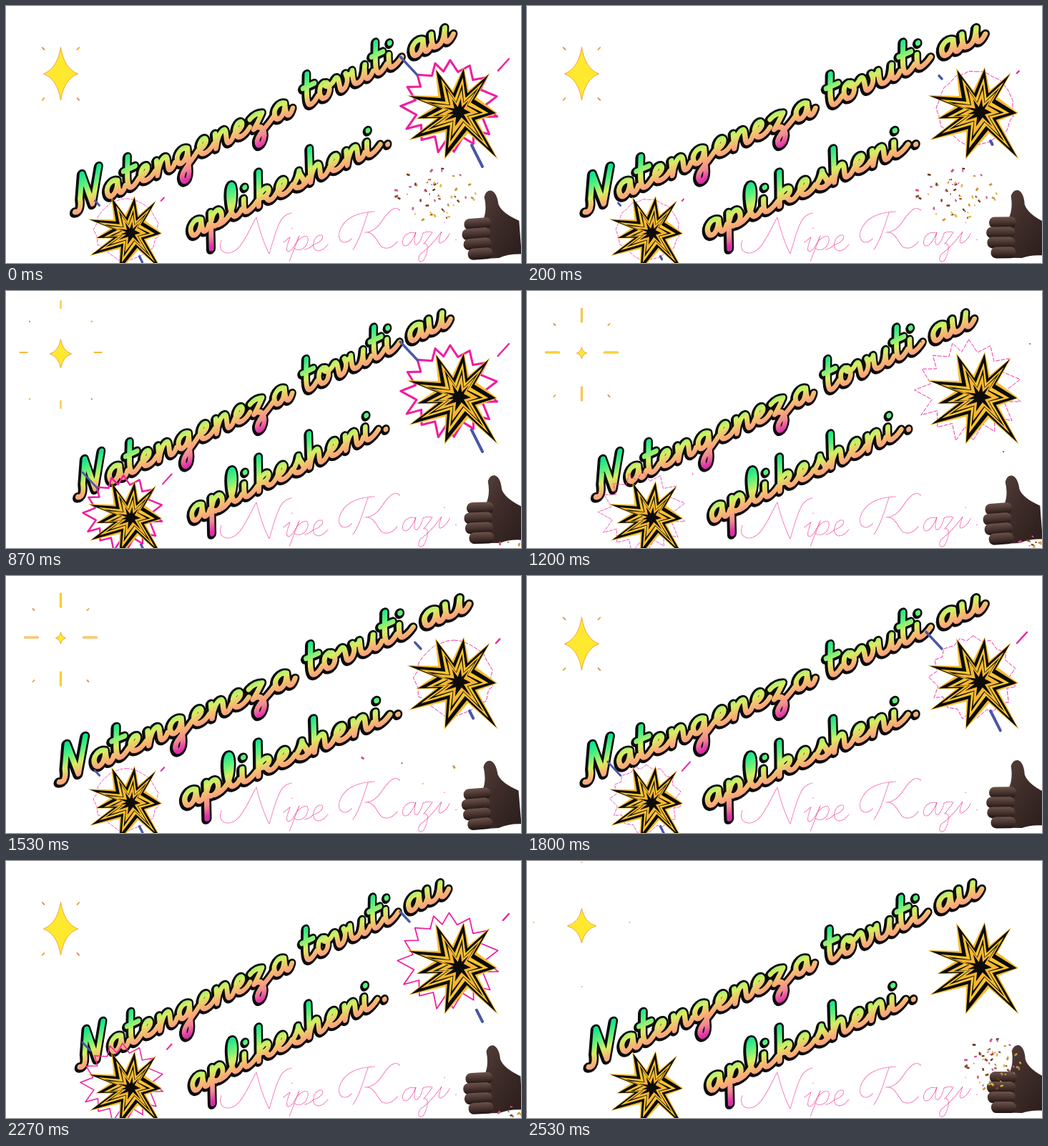
An HTML page that plays this animation: 720x360 px, repeating every 2590 ms.

```html
<!DOCTYPE html>
<html lang="sw">
<head>
<meta charset="utf-8">
<title>Natengeneza tovuti au aplikesheni.</title>
<style>
html, body { margin: 0; width: 100%; height: 100%; overflow: hidden; background: #fff; }
svg { display: block; width: 720px; height: 360px; }
path, line { stroke-linecap: round; stroke-linejoin: round; }
</style>
</head>
<body>
<svg viewBox="0 0 720 360" role="img" aria-label="Natengeneza tovuti au aplikesheni. Nipe Kazi.">
  <defs>
    <linearGradient id="ink" gradientUnits="userSpaceOnUse" x1="0" y1="-46" x2="0" y2="24">
      <stop offset="0" stop-color="#12e48c"/>
      <stop offset=".22" stop-color="#62f07c"/>
      <stop offset=".42" stop-color="#d6ef62"/>
      <stop offset=".6" stop-color="#f9b374"/>
      <stop offset=".8" stop-color="#f28a92"/>
      <stop offset="1" stop-color="#e02cac"/>
    </linearGradient>
    <linearGradient id="skin" x1="0" y1="0" x2="1" y2="1">
      <stop offset="0" stop-color="#5c4640"/>
      <stop offset=".5" stop-color="#3f2d2a"/>
      <stop offset="1" stop-color="#2a1d1b"/>
    </linearGradient>
    <linearGradient id="finger" x1="0" y1="0" x2="0" y2="1">
      <stop offset="0" stop-color="#6d534c"/>
      <stop offset=".6" stop-color="#412e2a"/>
      <stop offset="1" stop-color="#1d1311"/>
    </linearGradient>
  </defs>
  <g id="sparkle"></g>
  <g id="script" fill="none" stroke="#f0479f" stroke-width="1.1" stroke-dasharray=".6 1.7">
    <path d="M301 329C294 346 314 354 328 335C338 321 344 306 350 296C354 312 360 332 368 347C373 331 377 314 384 301Q389 292 399 290"/>
    <path d="M388 331Q394 326 397 324C394 333 390 343 395 344Q402 342 409 324M400 311v.5"/>
    <path d="M410 322L396 358M405 333C412 322 424 318 422 329C420 340 409 345 403 339M418 341Q424 340 430 334C440 332 446 323 441 321C433 320 427 332 431 340C436 346 444 342 450 334"/>
    <path d="M483 326C474 336 463 330 466 317C471 299 488 289 516 288M506 290C500 306 495 327 485 341M550 286C543 278 533 290 525 302C519 311 511 317 502 317C514 316 517 327 524 336C531 342 540 339 547 330"/>
    <path d="M572 318C562 314 552 325 555 334C560 341 569 328 573 317C570 329 570 336 575 334Q580 330 583 318Q590 315 596 317Q590 326 584 333C592 331 590 345 584 356C577 362 574 354 580 347Q594 337 609 316C606 325 603 333 608 332Q615 329 620 319M613 303v.5M629 327v2"/>
  </g>
  <g id="words"></g>
  <g id="bursts"></g>
  <g id="hand">
    <path fill="url(#skin)" d="M678 266Q681 257 688 258Q696 261 697 278Q701 291 724 303V350Q706 348 692 353L656 352L652 300L674 298Q681 285 678 266Z"/>
    <g id="fingers" fill="url(#finger)"></g>
  </g>
  <g id="confetti"></g>
</svg>
<script>
// All motion is counted in steps of 1/15 s
const LOOP = 2590, STEP = 200 / 3, STEPS = 39;
const $ = id => document.getElementById(id);
const clamp = v => Math.max(0, Math.min(1, v));
const wave = (i, period, peak) => Math.cos(2 * Math.PI * (i - peak) / period);

// Linear value from [position, value] pairs
function mix(t, keys) {
  if (t <= keys[0][0]) return keys[0][1];
  for (let i = 1; i < keys.length; i++) {
    const [a, va] = keys[i - 1], [b, vb] = keys[i];
    if (t <= b) return va + (vb - va) * (t - a) / (b - a);
  }
  return keys[keys.length - 1][1];
}

function seeded(seed) {
  return () => (seed = (seed * 16807) % 2147483647) / 2147483647;
}

// Cursive letters: [advance, path], baseline at 0
const glyphs = {
  N: [46, "M0-2C7 2 10-6 11-16L21-46L26-2L46-46"],
  a: [28, "M20-17C12-23 2-15 3-6C4 3 15 1 20-16C18-4 19 1 23 0Q26-1 29-6"],
  n: [29, "M5-19L2 0C6-11 13-20 18-19C23-17 15 0 21 0Q25 0 29-6"],
  e: [24, "M2-8C10-8 18-14 14-19C9-22 2-13 4-5C6 2 16 0 24-7"],
  t: [21, "M13-41C9-25 3-8 6-2C9 2 15-2 21-7M3-25L20-25"],
  g: [33, "M21-17C13-23 3-15 4-6C5 2 16 0 21-16L16 14C13 26 4 26 5 17C7 8 20 4 33-7"],
  z: [34, "M3-17Q12-22 21-18Q12-8 5-2C14-5 19 2 17 12C13 24 3 24 6 14C10 6 24 2 34-6"],
  o: [26, "M12-20C4-19 1-6 6-1C13 3 22-8 17-17C15-21 11-19 14-15Q19-11 26-16"],
  v: [25, "M2-18Q6-21 7-16C8-8 5 0 10 0C16-1 22-10 19-19Q21-14 25-16"],
  u: [32, "M4-19C3-10 0 0 8 0C15 0 20-9 23-19C20-9 18 0 24 0Q28-1 32-6"],
  i: [23, "M6-18C4-9 1 0 8 0Q15-1 23-7M11-32v.1"],
  p: [31, "M7-20L-3 26M6-10C11-20 20-23 21-13C21-2 10 3 5-3M14 0Q24 0 31-6"],
  l: [18, "M1-6C12-18 17-44 11-43C5-40 0-4 7-1Q13 0 18-6"],
  k: [28, "M11-43Q6-20 1 0M3-9C8-19 19-22 19-15C18-9 10-8 7-9Q13-9 15-3Q19 2 28-6"],
  s: [23, "M1-6Q10-13 13-21C12-13 20-6 15-1Q9 2 4-2M15-1Q20-2 23-7"],
  h: [30, "M11-43L2 0C6-12 14-21 18-18C21-15 14 0 20 0Q25 0 30-6"],
  ".": [8, "M10-3v.1"]
};

function word(text, x, base, wide) {
  let pen = 0, parts = "";
  for (const ch of text) {
    const [adv, d] = glyphs[ch];
    parts += `<path transform="translate(${pen} 0)" d="${d}"/>`;
    pen += adv;
  }
  const slope = -.427;
  const layer = (shift, color, width) =>
    `<g transform="matrix(${wide} ${slope * wide} .25 1 ${x - shift} ${base + slope * x + shift})" stroke="${color}" stroke-width="${width}">${parts}</g>`;
  return [layer(.8, "#0c0c0c", 13.5), layer(0, "url(#ink)", 7)];
}

const words = [
  word("Natengeneza", 75, 322.5, 1.03), word("tovuti", 423, 322.5, 1),
  word("au", 584, 322.5, 1.08), word("aplikesheni.", 249, 431, 1.03)
];
$("words").setAttribute("fill", "none");
$("words").innerHTML = words.map(w => w[0]).join("") + words.map(w => w[1]).join("");

$("fingers").innerHTML = [[647, 295, 38], [643, 309, 40], [644, 323, 39], [649, 337, 35]]
  .map(([x, y, w]) => `<rect x="${x}" y="${y}" width="${w}" height="16" rx="7.5"/>`).join("");

// Sparkle poses: star centre and radii, axis rays, diagonal ticks
const big = { cy: 95, rx: 24, ry: 37, dx: 23, dy: 34, tick: 4 };
const tiny = { cy: 87, rx: 7, ry: 8, ax: 32, ay: 46, len: 18, w: 3, dx: 37, dy: 49, tick: 3 };
const small = { cy: 88, rx: 15, ry: 20, ax: 47, ay: 65, len: 10, w: 2, dx: 43, dy: 54, tick: 1 };
const middle = { cy: 91, rx: 20, ry: 24, ax: 67, ay: 87, len: .1, w: 2 };
const poses = [tiny, small, middle, big, big, tiny];

function drawSparkle(s) {
  const { rx, ry } = s, cx = 76.5, qx = rx * .2, qy = ry * .2;
  const seg = (x, y, dx, dy, w, color) =>
    `<line x1="${x}" y1="${y}" x2="${x + dx}" y2="${y + dy}" stroke="${color}" stroke-width="${w}"/>`;
  let out = `<path transform="translate(${cx} ${s.cy})" fill="#ffe92f" stroke="#f2a33a" stroke-width="1"
    d="M0 ${-ry}Q${qx} ${-qy} ${rx} 0Q${qx} ${qy} 0 ${ry}Q${-qx} ${qy} ${-rx} 0Q${-qx} ${-qy} 0 ${-ry}Z"/>`;
  for (const k of [-1, 1]) {
    if (s.ax) {
      for (const [w, c] of [[s.w, "#f2a33a"], [s.w - 1.3, "#ffe23a"]]) {
        out += seg(cx + k * s.ax, 86, k * s.len, 0, w, c);
        out += seg(cx, 89 + k * s.ay, 0, k * s.len, w, c);
      }
    }
    if (s.dx) {
      const cy = s.ax ? 97 : 95;
      for (const j of [-1, 1])
        out += seg(cx + k * s.dx, cy + j * s.dy, k * s.tick * .7, j * s.tick * .7, 1.8, j * k > 0 ? "#e88a4a" : "#eda63a");
    }
  }
  $("sparkle").innerHTML = out;
}

// Burst spikes: outer tip followed by the notch after it
const spikes = [
  -34, -62, -10, -31, 6, -64, 13, -31, 43, -56, 24, -21, 53, 1, 25, 12, 54, 66,
  12, 29, -21, 66, -20, 27, -71, 39, -34, 9, -61, 9, -36, -8, -74, -24, -30, -23
];

function poly(scale, thin) {
  let d = "";
  for (let i = 0; i < spikes.length; i += 2) {
    const k = i % 4 ? scale * thin : scale;
    d += (i ? "L" : "M") + (spikes[i] * k).toFixed(1) + " " + (spikes[i + 1] * k).toFixed(1);
  }
  return d + "Z";
}

const core = [
  [1, 1, "#f7bd2e"], [.96, .9, "#0d0b0a"], [.76, .86, "#f9c62f"],
  [.62, .76, "#0d0b0a"], [.5, .86, "#f7b634"], [.3, .8, "#0d0b0a"]
].map(([s, thin, c]) => `<path d="${poly(s, thin)}" fill="${c}"/>`).join("");

function halo(p) {
  const rnd = seeded(77), count = 15, r = 52 + 26 * p;
  const dip = 1 - .3 * clamp(p * 1.6);
  let d = "";
  for (let i = 0; i < count * 2; i++) {
    const a = i * Math.PI / count - 1.5 + (rnd() - .5) * .12;
    const k = i % 2 ? r * dip : r * (.9 + .14 * rnd());
    d += (i ? "L" : "M") + (Math.cos(a) * k - 6 - 12 * p).toFixed(1) + " " + (Math.sin(a) * k - 6 - 6 * p).toFixed(1);
  }
  const w = .9 + 2.2 * Math.exp(-(((p - .66) / .11) ** 2));
  const dash = w < 1.3 ? ' stroke-dasharray="5 2.5"' : "";
  return `<path d="${d}Z" fill="none" stroke="#f01e9e" stroke-width="${w}"${dash}/>`;
}

const streaks = [
  [-54, -47, -83, -78, "#4858a6", 3.5],
  [14, 40, 32, 76, "#4858a6", 4],
  [51, -55, 69, -75, "#ee249f", 2.5]
];

function burst(x, y, scale, p) {
  let back = "", front = "";
  if (p > .05 && p < .97) {
    back = halo(p);
    const head = clamp((p - .05) / .45), tail = clamp((p - .6) / .3);
    for (const [x1, y1, x2, y2, c, w] of streaks) {
      const at = k => [x1 + (x2 - x1) * k, y1 + (y2 - y1) * k];
      const [ax, ay] = at(tail), [bx, by] = at(head);
      front += `<line x1="${ax}" y1="${ay}" x2="${bx + .1}" y2="${by}" stroke="${c}" stroke-width="${tail > .95 ? 2 : w}"/>`;
    }
  }
  return `<g transform="translate(${x} ${y}) scale(${scale})">${back}${core}${front}</g>`;
}

const rnd = seeded(4211);
const tints = ["#c9963a", "#8a4a2a", "#d64f8f", "#e8b53c", "#6b3a1e"];
const bits = Array.from({ length: 64 }, (_, i) => {
  const a = rnd() * Math.PI * 2, r = Math.sqrt(rnd()) * 1.1;
  return { x: Math.cos(a) * r, y: Math.sin(a) * r, size: 2 + rnd() * 3, spin: rnd() * 180, tint: tints[i % 5] };
});

// Confetti gathers in the corner, then flies up to the left
function drawConfetti(q) {
  const n = mix(q, [[0, 0], [2, 6], [3, 3], [8, 12], [10, 60], [11, 54], [13, 4], [14, 0]]);
  const cx = mix(q, [[8, 706], [10, 653], [11, 602], [13, 565]]);
  const cy = mix(q, [[8, 352], [10, 284], [11, 264], [13, 262]]);
  const rx = mix(q, [[8, 13], [10, 34], [11, 50], [13, 60]]);
  const ry = mix(q, [[8, 7], [10, 33], [11, 34], [13, 38]]);
  $("confetti").innerHTML = bits.slice(0, Math.round(n)).map(b =>
    `<rect width="${b.size}" height="${b.size * .6}" fill="${b.tint}" transform="translate(${cx + b.x * rx} ${cy + b.y * ry}) rotate(${b.spin + q * 13})"/>`
  ).join("");
}

// The loop opens on a still pose; the stickers restart right after it
function draw(i) {
  const opening = i === 0;
  const p = (i - .9) / 18.75 % 1;
  drawSparkle(opening ? big : poses[i % 6]);
  $("bursts").innerHTML = burst(634, 149, 1, opening ? .65 : p) + burst(175, 318, .82, opening ? .17 : p);
  drawConfetti(opening ? 11 : (i + 8) % 18);

  const s = .95 + .053 * wave(i, 18, 6);
  $("words").setAttribute("transform", `translate(${360 * (1 - s)} 0) scale(${s} 1)`);
  const k = .5 - .5 * wave(i, 6, 2.3);
  $("hand").setAttribute("transform", `translate(${-4 * k} ${-2 * k}) rotate(${-5 * k} 715 345)`);
}

let last = -1;
const began = performance.now();
function tick() {
  const t = (performance.now() - began) % LOOP;
  const step = Math.floor((t + 5) / STEP) % STEPS;
  if (step !== last) draw(last = step);
  requestAnimationFrame(tick);
}
tick();
</script>
</body>
</html>
```
